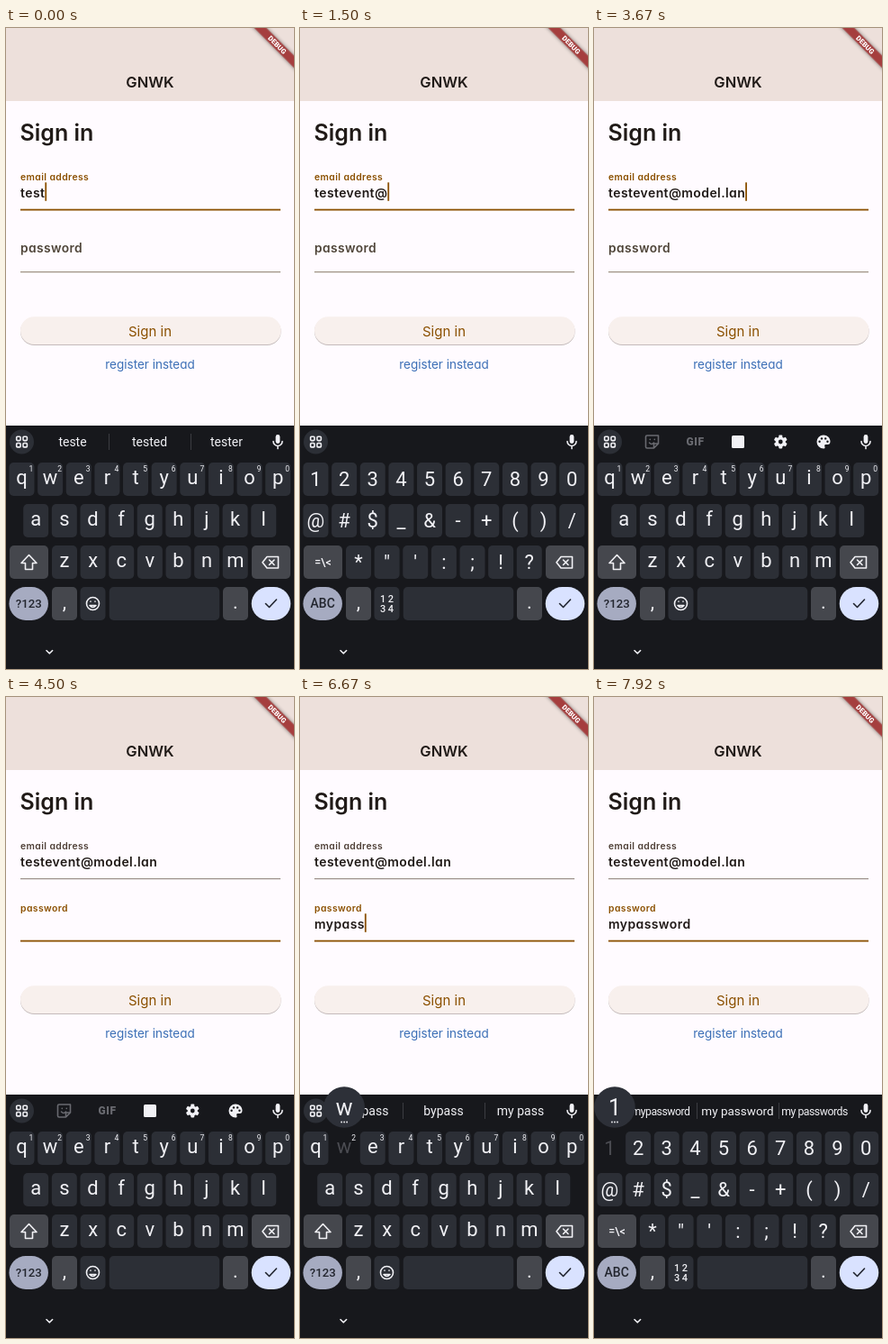
These frames come from a looping animation (320 by 711 pixels, 8 s). An HTML page:

```html
<!DOCTYPE html>
<html lang="en">
<head>
<meta charset="utf-8">
<title>Sign in</title>
<style>
  html, body { margin: 0; width: 100%; height: 100%; overflow: hidden; background: #fffbff; }
  svg { display: block; width: 100%; height: 100%; }
  .app { font-family: Inter, "Open Sans", sans-serif; font-feature-settings: "cv11" 1; font-weight: 600; }
  .field { font-size: 14px; letter-spacing: .4px; fill: #201a17; }
  .label { letter-spacing: .4px; }
  .kb { font-family: Roboto, "Noto Sans", sans-serif; fill: #f1f1f5; }
  .mid { text-anchor: middle; }
  .line { fill: none; stroke: #f1f1f5; stroke-width: 1.6; stroke-linejoin: round; stroke-linecap: round; }
</style>
</head>
<body>
<svg id="stage" viewBox="0 0 320 711">
  <rect width="320" height="711" fill="#fffbff"/>
  <g class="app">
    <rect width="320" height="81" fill="#ede0db"/>
    <text class="mid" x="160" y="66" font-size="16.5" fill="#201a17">GNWK</text>
    <text x="15.5" y="125" font-size="25" fill="#201a17">Sign in</text>
    <text class="label" id="mailLabel" x="16" y="169" font-size="10.4">email address</text>
    <text class="field" id="mail" x="16" y="188.300"></text>
    <rect id="mailLine" x="16" width="289"/>
    <text class="label" id="passLabel" x="16">password</text>
    <text class="field" id="pass" x="16" y="257.300"></text>
    <rect id="passLine" x="16" width="289"/>
    <rect id="caret" width="1.8" height="20.5" fill="#8b5000"/>
    <rect x="16" y="320.300" width="289.500" height="30.700" rx="15.300" fill="#f8f0ed"
      style="filter:drop-shadow(0 1px .6px rgba(60,40,30,.3))"/>
    <text class="mid" x="160" y="341.5" font-size="15" font-weight="400" fill="#8b5000">Sign in</text>
    <text class="mid" x="160" y="378" font-size="13.5" font-weight="400" fill="#3b6fb6">register instead</text>
  </g>
  <g transform="translate(301.300 18.700) rotate(45)">
    <rect x="-40" y="-4.700" width="80" height="9.400" fill="#a53e3e" style="filter:drop-shadow(0 0 2px rgba(0,0,0,.5))"/>
    <text class="mid" y="2.700" font-family="Roboto, sans-serif" font-size="7.800" font-weight="900" fill="#fff">DEBUG</text>
  </g>
  <g class="kb">
    <rect y="441" width="320" height="270" fill="#17181c"/>
    <circle cx="17.5" cy="459" r="13.5" fill="#2c2f36"/>
    <g class="line">
      <rect x="11.7" y="453.2" width="4.4" height="4.4" rx="1"/><rect x="19" y="453.2" width="4.4" height="4.4" rx="1"/>
      <rect x="11.7" y="460.5" width="4.4" height="4.4" rx="1"/><rect x="19" y="460.5" width="4.4" height="4.4" rx="1"/>
      <path d="M297 458.5a5 5 0 0 0 10 0M302 463.8v2.8"/>
    </g>
    <rect x="299.6" y="451" width="4.8" height="10" rx="2.4"/>
    <g id="tips">
      <path d="M114.5 450v18M205.5 450v18" stroke="#3b3c42"/>
    </g>
    <g id="tools">
      <path class="line" style="stroke:#696a70" d="M59 452h12.500v9l-5 5h-7.500q-1.500 0-1.500-1.500v-11q0-1.500 1.500-1.500zM71.500 461h-5v5M61.500 460q2.500 3 5 0M62.300 456.300v.2M67.300 456.300v.2"/>
      <text class="mid" x="112.500" y="463" font-size="12" font-weight="900" letter-spacing=".6" style="fill:#696a70">GIF</text>
      <rect x="153" y="452" width="14" height="14" rx="1.500"/>
      <g id="gear" transform="translate(207.300 459)"></g>
      <path d="M255 451.500a7.500 7.500 0 0 0 0 15c1.500 0 1.900-1.200 1.400-2.200-.7-1.500.3-2.300 1.500-2.300h1.700q2.900 0 2.900-3.500c0-4-3.400-7-7.500-7z"/>
      <g fill="#17181c"><circle cx="250.600" cy="458.800" r="1.200"/><circle cx="253" cy="455.400" r="1.200"/>
        <circle cx="257.200" cy="455.400" r="1.200"/><circle cx="259.500" cy="458.800" r="1.200"/></g>
    </g>
    <g id="shared"></g>
    <g id="letters"></g>
    <g id="symbols"></g>
    <path class="line" d="M45 690.500l3.300 3.300 3.300-3.300"/>
    <g id="popup">
      <circle r="22.800" fill="#2d3038"/>
      <text class="mid" id="popChar" y="9" font-size="25"></text>
      <g id="dots"><circle cx="-3" cy="16.500" r=".9"/><circle cy="16.500" r=".9"/><circle cx="3" cy="16.500" r=".9"/></g>
    </g>
  </g>
</svg>
<script>
const $ = id => document.getElementById(id);
const NS = 'http://www.w3.org/2000/svg';
const PITCH = 31.63, ROWS = [500.5, 546.5, 592.5, 638.5];
const PLAIN = '#2c2f36', SOFT = '#45474d', BROWN = '#8b5000';
const FIELD_GAP = 69, POPUP_EDGE = 23;
const LOOP = 8000, FPS = 12;

function add(parent, tag, attrs, text) {
  const node = document.createElementNS(NS, tag);
  for (const name in attrs) node.setAttribute(name, attrs[name]);
  if (text) node.textContent = text;
  return parent.appendChild(node);
}
const set = (node, attrs) => { for (const name in attrs) node.setAttribute(name, attrs[name]); };
const show = (node, on) => { node.style.display = on ? '' : 'none'; };
const box = (parent, x, y, w, fill, rx = 5) =>
  add(parent, 'rect', { x: x - w / 2, y: y - 18.5, width: w, height: 37, rx, fill });
const label = (parent, x, y, size, text, attrs) =>
  add(parent, 'text', { x, y, class: 'mid', 'font-size': size, ...attrs }, text);
const icon = (parent, d, stroke = '#f1f1f5') =>
  add(parent, 'path', { d, class: 'line', style: `stroke:${stroke}` });

const keys = {};
function key(parent, ch, x, y, fill = PLAIN) {
  const rect = box(parent, x, y, 28, fill);
  const text = label(parent, x, y + (/[a-z.,]/.test(ch) ? 5.3 : 7.5), 22, ch);
  keys[ch] = { x, y, rect, text };
}
const row = (parent, chars, x, y) => [...chars].forEach((ch, i) => key(parent, ch, x + i * PITCH, y));

const shared = $('shared'), letters = $('letters'), symbols = $('symbols');
const [r1, r2, r3, r4] = ROWS;

// keys common to both layouts
box(shared, 25.5, r3, 43, SOFT);
box(shared, 294.5, r3, 43, SOFT);
icon(shared, 'M290 586.500h12.500v12.500h-12.500l-5-6.250zM292.500 590l5.500 5.500M298 590l-5.500 5.500');
box(shared, 25.2, r4, 43.5, '#a6abc1', 18.5);
box(shared, 294.5, r4, 43.5, '#d9e2ff', 18.5);
icon(shared, 'M288.500 638.500l4 4 8-8.500', '#20242f');
key(shared, ',', 65, r4, SOFT);
key(shared, '.', 255, r4, SOFT);
box(shared, 96.5, r4, 28, PLAIN);
box(shared, 176, r4, 122.5, PLAIN);

// letters
row(letters, 'qwertyuiop', 17.5, r1);
[...'1234567890'].forEach((n, i) => label(letters, 28 + i * PITCH, 491.5, 8.5, n));
row(letters, 'asdfghjkl', 33.2, r2);
row(letters, 'zxcvbnm', 65, r3);
icon(letters, 'M25.500 584.500l8.500 9h-4.500v7h-8v-7h-4.500z');
label(letters, 25.2, 643, 13.2, '?123', { style: 'fill:#22252e', 'font-weight': 500 });
icon(letters, 'M103.500 638.500a7 7 0 1 1-14 0a7 7 0 1 1 14 0M93 640.500q3.500 4 7 0zM94 636v.3M99 636v.3');

// symbols
row(symbols, '1234567890', 17.5, r1);
row(symbols, '@#$_&-+()/', 17.5, r2);
row(symbols, '*"\':;!?', 65, r3);
label(symbols, 25.5, 597, 12.5, '=\\<', { 'font-weight': 500 });
label(symbols, 25.2, 643.3, 14, 'ABC', { style: 'fill:#22252e', 'font-weight': 500 });
label(symbols, 96.5, 636.5, 11, '1 2', { 'font-weight': 500 });
label(symbols, 96.5, 648, 11, '3 4', { 'font-weight': 500 });

// gear icon
for (let a = 0; a < 360; a += 60)
  add($('gear'), 'rect', { x: -2, y: -7.4, width: 4, height: 4, rx: .8, transform: `rotate(${a})` });
add($('gear'), 'circle', { r: 4, fill: 'none', stroke: '#f1f1f5', 'stroke-width': 3.2 });

const tips = [74, 159.5, 245].map(x => label($('tips'), x, 463.5, 14, ''));

// [key, tick of the press]; the letter lands one tick later
const MAIL = [['e', 1], ['v', 3], ['e', 5], ['n', 6], ['t', 8], ['@', 17], ['m', 25], ['o', 27], ['d', 29],
  ['e', 31], ['l', 34], ['.', 36], ['l', 38], ['a', 40], ['n', 42]];
const PASS = [['m', 65], ['y', 68], ['p', 71], ['a', 72], ['s', 75], ['s', 77], ['w', 80], ['o', 84],
  ['r', 86], ['d', 88]];
const PRESSES = [...MAIL, ...PASS, ['1', 95]];
const FOCUS = 48;
const typed = (list, tick) => list.filter(([, at]) => at < tick).map(([ch]) => ch).join('');

const WORDS = {
  test: ['teste', 'tested', 'tester'],
  m: ['m', 'my', 'more'],
  my: ['my', 'myself', 'mystery'],
  mypass: ['mypass', 'bypass', 'my pass'],
};
function suggest(word) {
  if (WORDS[word]) return WORDS[word];
  if (word.startsWith('test')) return [word, 'tested', 'tester'];
  const tail = 'my ' + word.slice(2);
  return [word, tail, tail + 's'];
}

const mix = (a, b, p) => a + (b - a) * p;
const clamp = (v, lo, hi) => Math.max(lo, Math.min(hi, v));
const underline = (y, active, idle) =>
  active ? { y: y - .3, height: 1.8, fill: BROWN } : { y: y + .2, height: 1, fill: idle };
let pressed = null;

function drawFields(tick, mail, pass) {
  const onPass = tick >= FOCUS;
  $('mail').textContent = mail;
  $('pass').textContent = pass;
  set($('mailLabel'), { fill: onPass ? '#4f4037' : BROWN });
  set($('mailLine'), underline(201, !onPass, '#85786f'));
  set($('passLine'), underline(201 + FIELD_GAP, onPass, '#887b66'));

  const p = clamp((tick - FOCUS + .6) / 2.4, 0, 1), lift = p * p * (3 - 2 * p);
  set($('passLabel'), { y: mix(248.5, 238, lift), 'font-size': mix(13.8, 10.4, lift), fill: onPass ? BROWN : '#4f4539' });

  const last = PRESSES.reduce((t, [, at]) => at < tick ? at + 1 : t, 0);
  const since = tick - (onPass ? Math.max(last, FOCUS) : last);
  const field = $(onPass ? 'pass' : 'mail');
  set($('caret'), { x: 16 + field.getComputedTextLength(), y: 171.3 + (onPass ? FIELD_GAP : 0) });
  show($('caret'), Math.floor(since / 6) % 2 === 0);
}

function drawBar(tick, mail, pass) {
  const words = tick < 18 || tick > 65;
  show($('tips'), words);
  show($('tools'), tick > 21 && !words);
  if (!words) return;
  suggest(pass || mail).forEach((word, i) => {
    const long = word.length > 9;
    tips[i].textContent = word;
    set(tips[i], { 'font-size': !long ? 14 : i === 1 ? 13.5 : 12.3, 'letter-spacing': long && i !== 1 ? -.5 : 0 });
  });
}

function drawKeys(tick) {
  const onSymbols = (tick >= 11 && tick < 21) || tick >= 92;
  show(letters, !onSymbols);
  show(symbols, onSymbols);
  if (pressed) {
    show(pressed.rect, true);
    pressed.text.style.fill = '';
  }
  const hit = PRESSES.find(([, at]) => at === tick);
  show($('popup'), hit);
  pressed = hit && keys[hit[0]];
  if (!hit) return;
  const more = /[a-eiosuyrtwpqn1]/.test(hit[0]);
  const x = clamp(pressed.x, POPUP_EDGE, 320 - POPUP_EDGE);
  set($('popup'), { transform: `translate(${x} ${pressed.y - 45.5})` });
  $('popChar').textContent = hit[0];
  show($('dots'), more);
  if (more) {
    show(pressed.rect, false);
    pressed.text.style.fill = '#4b4c52';
  }
}

function draw(ms) {
  const tick = Math.floor((ms % LOOP + 4) * FPS / 1000) % (LOOP * FPS / 1000);
  const mail = 'test' + typed(MAIL, tick), pass = typed(PASS, tick);
  drawFields(tick, mail, pass);
  drawBar(tick, mail, pass);
  drawKeys(tick);
}

const start = performance.now();
function loop() {
  draw(performance.now() - start);
  requestAnimationFrame(loop);
}
loop();
</script>
</body>
</html>
```
